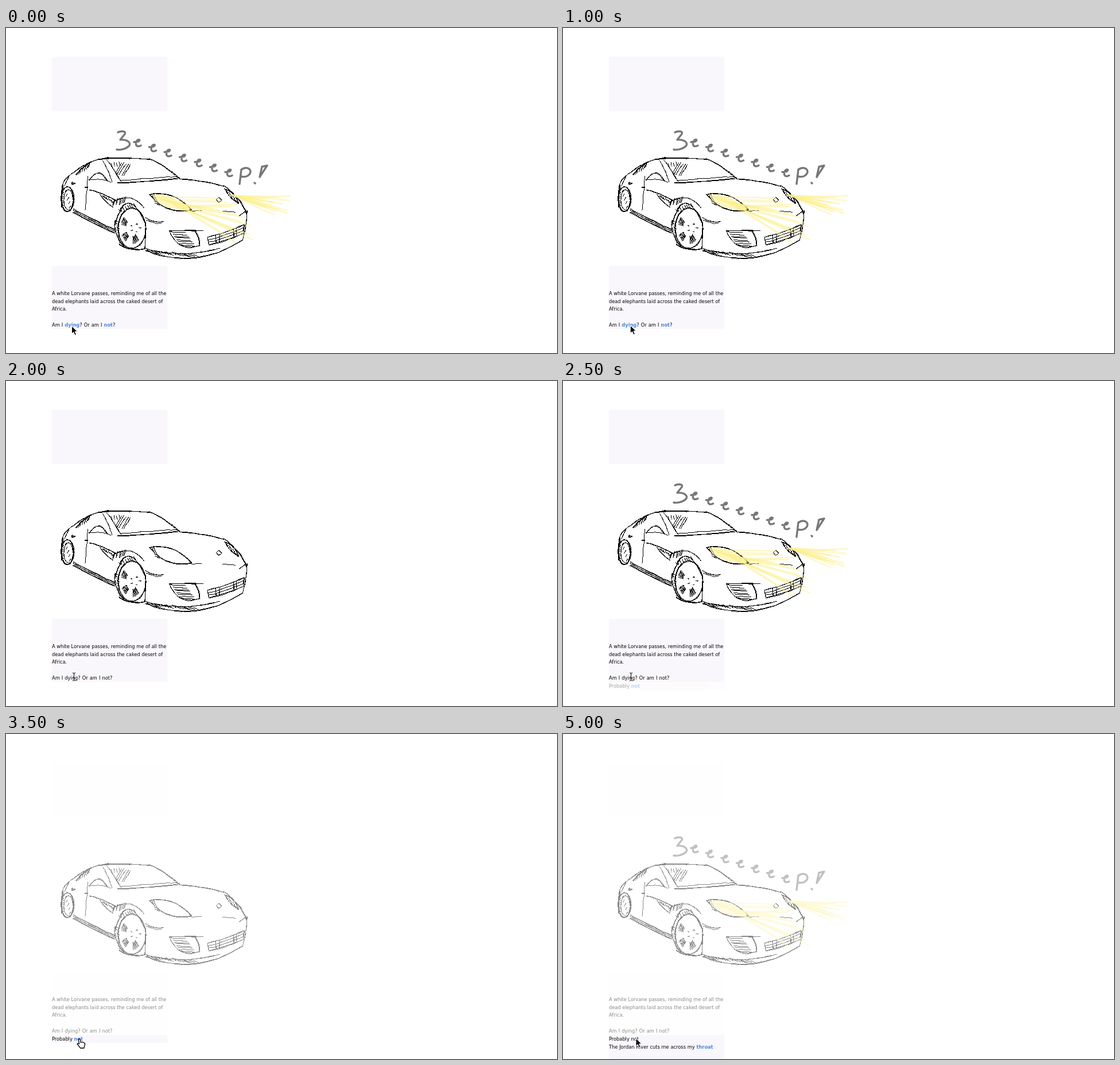
These frames come from a looping animation (960 by 567 pixels, 5.1 s). An HTML page:

```html
<!DOCTYPE html>
<html lang="en">
<head>
<meta charset="utf-8">
<title>Passing car</title>
<style>
  html, body { margin: 0; width: 100%; height: 100%; overflow: hidden; background: #fff; }
  svg { display: block; width: 960px; height: 567px; }
  text { font: 8.25px "DejaVu Sans", Verdana, sans-serif; white-space: pre; }
  .spaced { word-spacing: .5px; }
  .link { font-weight: bold; fill: #4c88da; }
  .panel { fill: #f9f7fc; }
  #car { fill: none; stroke: #000; shape-rendering: crispEdges; }
  #beams { fill: none; stroke: #fdf08a; stroke-linecap: round; }
  #word { fill: none; stroke: #777; stroke-width: 3.4; stroke-linecap: round; stroke-linejoin: round; }
</style>
</head>
<body>
<svg viewBox="0 0 960 567">
  <g id="panels">
    <rect class="panel" x="80" y="50" width="201.5" height="95"/>
    <rect class="panel" x="80" y="415" width="201.5" height="110"/>
  </g>
  <g id="first">
    <g id="car"></g>
    <g id="flash">
      <g id="beams"></g>
      <g id="word"></g>
    </g>
    <text x="80" y="466">A white Lorvane passes, reminding me of all the</text>
    <text x="80" y="479.7">dead elephants laid across the caked desert of</text>
    <text x="80" y="493.4">Africa.</text>
    <text id="ask" class="spaced" x="80" y="521">Am I <tspan class="link">dying</tspan>? Or am I <tspan class="link">not</tspan>?</text>
    <text id="asked" class="spaced" x="80" y="521">Am I dying? Or am I not?</text>
  </g>
  <g id="second">
    <rect class="panel" x="80" y="525" width="201.5" height="14"/>
    <text id="reply" x="80" y="534.6">Probably <tspan class="link">not</tspan></text>
    <text id="replied" x="80" y="534.6">Probably not</text>
  </g>
  <g id="third">
    <rect class="panel" x="80" y="539" width="201.5" height="28"/>
    <text x="80" y="549.3" word-spacing=".2">The Jordan River cuts me across my <tspan class="link">throat</tspan></text>
  </g>
  <g id="cursor">
    <path id="arrow" d="M0,0V13.5L3.2,10.6L5.6,16L8,15L5.7,9.7H10Z" stroke="#fff"/>
    <path id="beam" d="M-2.5,-7Q0,-7 0,-5V5Q0,7 -2.5,7M2.5,-7Q0,-7 0,-5M0,5Q0,7 2.5,7M-1.5,2H1.5" fill="none" stroke="#000"/>
    <path id="hand" d="M0,1Q1.5,-1 3,1L4,6Q8,4 11.4,8.5L9.6,16H3.4L-2,9Q-2.5,7 1.2,8.5Z" fill="#fff" stroke="#000" stroke-width="1.3"/>
  </g>
</svg>
<script>
const NS = "http://www.w3.org/2000/svg";
const $ = id => document.getElementById(id);

let seed = 11;
const rand = () => (seed = seed * 16807 % 2147483647) / 2147483647;
const jit = a => (rand() * 2 - 1) * a;
const mix = (a, b, k) => a + (b - a) * k;

function add(parent, d, attrs = {}) {
  const p = document.createElementNS(NS, "path");
  p.setAttribute("d", d);
  for (const k in attrs) p.setAttribute(k, attrs[k]);
  parent.appendChild(p);
}

// Traces at(0..1) with an unsteady hand, once per pass.
function trace(at, length, passes) {
  const n = Math.max(1, Math.round(length / 9));
  for (let p = 0; p < passes; p++) {
    const dx = p && jit(.9), dy = p && jit(.9);
    const pts = [];
    for (let i = 0; i <= n; i++) {
      const [x, y] = at(i / n);
      pts.push(`${(x + dx + jit(.6)).toFixed(1)},${(y + dy + jit(.6)).toFixed(1)}`);
    }
    add($("car"), "M" + pts.join("L"));
  }
}

// A line that swells sideways by `bulge`: up when drawn rightwards.
function arc(x0, y0, x1, y1, bulge = 0, passes = 2) {
  const len = Math.hypot(x1 - x0, y1 - y0);
  trace(k => {
    const b = bulge * 4 * k * (1 - k) / len;
    return [mix(x0, x1, k) + (y1 - y0) * b, mix(y0, y1, k) - (x1 - x0) * b];
  }, len + 2 * Math.abs(bulge), passes);
}
function leaf(x0, y0, x1, y1, over, under) {
  arc(x0, y0, x1, y1, over);
  arc(x0, y0, x1, y1, under);
}
function ring(cx, cy, rx, ry, passes = 1) {
  trace(k => [cx + rx * Math.cos(k * 2 * Math.PI), cy + ry * Math.sin(k * 2 * Math.PI)], 4 * (rx + ry), passes);
}
function hatch(x0, y0, x1, y1, dx, dy, n) {
  for (let i = 0; i < n; i++) {
    const x = mix(x0, x1, i / (n - 1)) + jit(1), y = mix(y0, y1, i / (n - 1)) + jit(1);
    arc(x, y, x + dx, y + dy, 0, 1);
  }
}

function cabin() {
  arc(121, 250, 185, 226, 6);
  arc(160, 229, 250, 229, 2, 3);
  arc(248, 228, 302, 263, 3);
  arc(176, 230, 200, 268, 1);
  arc(168, 231, 185, 268, 1, 1);
  arc(194, 270, 300, 262, -1);
  arc(200, 266, 298, 259, 0, 1);
  arc(145, 266, 177, 267, 14);
  arc(144, 265, 183, 269, 3, 1);
  hatch(184, 236, 196, 233, 2, 7, 4);
  hatch(203, 234, 216, 238, -12, 20, 5);
  hatch(128, 246, 147, 234, -3, 10, 10);
  arc(121, 256, 150, 233, 2);
}

function side() {
  arc(121, 250, 99, 272, -3);
  arc(99, 272, 97, 312, -1, 3);
  arc(110, 258, 101, 276, 0, 1);
  ring(107, 299, 11, 22, 3);
  ring(109, 300, 8, 18);
  hatch(98, 285, 97, 312, 4, 2, 8);
  hatch(103, 287, 110, 315, 3, -5, 5);
  ring(117, 271, 4, 2, 2);
  ring(140, 278, 3, 2, 2);
  arc(143, 258, 138, 318, 0, 1);
  for (let i = 0; i < 3; i++) arc(117, 315 + 3 * i, 191, 352 + 3 * i, -1);
  arc(145, 282, 190, 300, 2);
  arc(164, 290, 187, 313, -2);
  hatch(168, 291, 184, 300, 4, 6, 6);
  hatch(188, 300, 210, 294, -3, 11, 9);
  arc(185, 305, 241, 314, 13);
}

function frontWheel() {
  const cx = 219, cy = 349, rx = 24, ry = 35;
  ring(cx, cy, rx, ry, 2);
  arc(190, 345, 243, 340, 37);
  arc(190, 335, 208, 383, -6, 3);
  arc(198, 378, 243, 385, -5, 3);
  arc(243, 340, 241, 386, 1);
  hatch(191, 335, 196, 374, 4, 3, 10);
  hatch(197, 316, 222, 305, 3, 6, 8);
  for (let s = 0; s < 3; s++) {
    for (let i = -3; i <= 3; i++) {
      const a = (65 + 72 * s + i * 5) * Math.PI / 180;
      const at = r => [cx + rx * r * Math.cos(a), cy + ry * r * Math.sin(a)];
      arc(...at(.42), ...at(.8), 0, 1);
    }
  }
  for (let a = 0; a < 6; a += 1.26) ring(225 + 8 * Math.cos(a), 349 + 7 * Math.sin(a), 2, 2);
}

function front() {
  arc(302, 263, 380, 276, 2);
  arc(380, 275, 420, 325, 5);
  leaf(250, 290, 323, 318, 11, -12);
  arc(257, 290, 288, 316, -6, 1);
  hatch(252, 290, 262, 307, 5, 2, 6);
  leaf(381, 281, 406, 306, 5, -3);
  hatch(384, 283, 402, 300, 3, 6, 6);
  arc(323, 319, 341, 318, 0, 1);
  arc(378, 320, 400, 322, 1, 1);
  arc(406, 327, 419, 319);
  arc(420, 318, 412, 371, 2);
  arc(243, 331, 274, 338, -3);
  arc(245, 335, 271, 341, -2, 1);
  arc(243, 388, 413, 369, -22);
  arc(244, 385, 372, 384, -9);
  hatch(246, 387, 325, 395, 9, 5, 20);
  arc(284, 354, 343, 354, 1, 3);
  arc(285, 354, 338, 380, -14);
  arc(330, 354, 338, 381, 2);
  hatch(288, 357, 304, 378, 26, 1, 8);
  for (let i = 0; i < 4; i++) arc(351 + i, 365 + 4.3 * i, 415 - i, 343 + 5 * i, -2, i % 3 ? 1 : 2);
  arc(351, 365, 354, 378);
  arc(415, 343, 413, 358);
  for (const x of [366, 372, 397, 402]) arc(x, 361 - (x - 366) / 3, x, 374 - (x - 366) / 3);
  ring(371, 300, 4.8, 4.8);
}
[cabin, side, frontWheel, front].forEach(part => part());

// Light fans out from (x, y) to reach dx, between two heights.
function rays(n, x, y, spread, dx, top, bottom) {
  for (let i = 0; i < n; i++) {
    const k = rand(), x0 = x + spread * k, y0 = y + spread * k * .4;
    const x1 = x + dx + jit(22), y1 = mix(top, bottom, i / (n - 1));
    add($("beams"), `M${x0},${y0}Q${mix(x0, x1, .5)},${mix(y0, y1, .5) + jit(3)} ${x1},${y1}`,
      { "stroke-width": 1.2 + rand() * 2, opacity: .5 });
  }
}
rays(8, 258, 293, 58, 125, 297, 322);
rays(12, 262, 296, 58, 147, 322, 374);
rays(15, 390, 290, 18, 84, 293, 325);
add($("beams"), "M254,290Q285,287 320,317Q262,318 254,290Z", { fill: "#fdf08a", stroke: "none", opacity: .55 });

const word = $("word");
add(word, "M195,182C201,179 210,180 207,185L199,195C212,194 219,201 214,206C208,212 198,213 193,212");
for (let i = 0; i < 7; i++)
  add(word, "M-6,-2L2,-3C7,-7 0,-8 -2,-2C-4,5 0,7 6,4", { transform: `translate(${229 + 26.5 * i} ${201 + 8.7 * i})` });
add(word, "M410,247L407,272M410,247C420,240 429,247 425,254C421,260 414,260 410,259");
add(word, "M446,242L455,240L442,260ZM433,270L434,271");

// Pointer stops: ms, x, y, shape
const LOOP = 5100;
const stops = [
  [0, 114.5, 520, "arrow"], [1400, 120, 518, "arrow"], [1900, 118.5, 516, "beam"],
  [2600, 118.5, 516, "beam"], [3000, 125.5, 533, "hand"], [3700, 127, 531, "arrow"]
];
const ramp = (t, from, to) => Math.min(1, Math.max(0, (t - from) / (to - from)));
const show = (id, on) => $(id).setAttribute("visibility", on ? "visible" : "hidden");
const fade = (id, v) => $(id).setAttribute("opacity", v);

function draw(now) {
  const t = Math.floor(now % LOOP / 100) * 100;
  const a = stops.filter(s => s[0] <= t).pop();
  const b = stops[stops.indexOf(a) + 1] || a;
  const k = b === a ? 0 : ramp(t, a[0], b[0]) ** 2;
  $("cursor").setAttribute("transform", `translate(${mix(a[1], b[1], k)} ${mix(a[2], b[2], k)})`);
  for (const id of ["arrow", "beam", "hand"]) show(id, id === a[3]);

  show("flash", (t + 100) % 800 < 400);
  show("ask", t < 1900);
  show("asked", t >= 1900);
  show("reply", t < 3700);
  show("replied", t >= 3700);

  const past = ramp(t, 2600, 3200);
  fade("first", mix(1, .46, past));
  fade("panels", mix(1, .2, past));
  fade("second", ramp(t, 2200, 3050));
  fade("third", ramp(t, 3800, 4400));
}
const start = performance.now();
function loop() {
  draw(performance.now() - start);
  requestAnimationFrame(loop);
}
loop();
</script>
</body>
</html>
```
